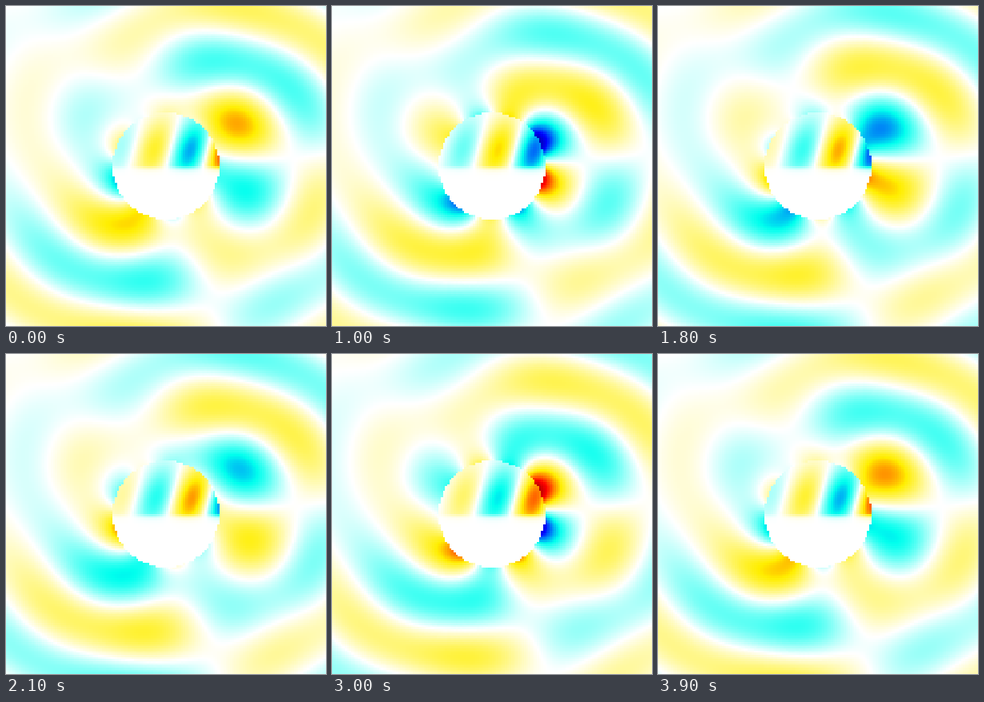
An HTML page with a canvas that plays this animation: 400x400 px, repeating every 4000 ms.

```html
<!DOCTYPE html>
<html>
<head>
<meta charset="utf-8">
<style>
html, body { margin: 0; height: 100%; overflow: hidden; background: #fff; }
canvas { display: block; width: 100vw; height: 100vh; image-rendering: pixelated; }
</style>
</head>
<body>
<canvas id="stage" width="150" height="150"></canvas>
<script>
const N = 150, CELL = 400 / N, RADIUS = 66.5;
const PERIOD = 4000, STEP = 100;
const K = 2 * Math.PI / 133.3; // wave number outside the disc, per pixel
const RAD = Math.PI / 180;

// Scattered wave: [order, amplitude, phase in degrees] of each multipole.
const MULTIPOLES = [
  [-5, .25, 274], [-4, .85, 228], [-3, .22, -71], [-2, 1.05, 192], [-1, .19, -59], [0, .42, 157],
  [1, .08, 100], [2, .34, 32], [3, .35, 95], [4, .45, 106], [5, .29, 140]
];

// Hankel function of the first kind, from its integral form.
function hankel(n, x) {
  const steps = 160, da = Math.PI / steps, dt = 4 / steps, sign = n % 2 ? -1 : 1;
  let re = 0, im = 0;
  for (let i = 0; i < steps; i++) {
    const a = (i + .5) * da, t = (i + .5) * dt;
    const phase = x * Math.sin(a) - n * a;
    re += Math.cos(phase) * da;
    im += Math.sin(phase) * da
      - (Math.exp(n * t) + sign * Math.exp(-n * t)) * Math.exp(-x * Math.sinh(t)) * dt;
  }
  return [re / Math.PI, im / Math.PI];
}

const cache = {};
function radial(r) {
  const key = Math.round(r * 2);
  return cache[key] ||= [0, 1, 2, 3, 4, 5].map(n => hankel(n, K * key / 2));
}

function outside(x, y, r) {
  const angle = Math.atan2(y, x), h = radial(r);
  let re = 0, im = 0;
  for (const [m, amplitude, phase] of MULTIPOLES) {
    const a = m * angle + phase * RAD, [hr, hi] = h[Math.abs(m)];
    re += amplitude * (hr * Math.cos(a) - hi * Math.sin(a));
    im += amplitude * (hr * Math.sin(a) + hi * Math.cos(a));
  }
  return [re, im];
}

// A wave running right and growing, which dies out just below the diameter.
function inside(x, y) {
  const top = Math.min(y, 0);
  const amplitude = Math.max(0, 1.01 + .011 * x)
    * Math.exp(-(((top + 18) / 40) ** 2)) * Math.exp(-Math.max(y, 0) / 3);
  const phase = (424 + 3.9 * x + top + 25) * RAD;
  return [amplitude * Math.cos(phase), amplitude * Math.sin(phase)];
}

const field = Array.from({ length: N * N }, (_, n) => {
  const x = (n % N + .5) * CELL - 200, y = (Math.floor(n / N) + .5) * CELL - 200;
  const r = Math.hypot(x, y);
  return r < RADIUS ? inside(x, y) : outside(x, y, r);
});

const WARM = [[255, 255, 255], [255, 238, 0], [255, 0, 0], [128, 0, 0]];
const COOL = [[255, 255, 255], [0, 255, 238], [0, 0, 255], [0, 0, 128]];

const ctx = document.getElementById('stage').getContext('2d');
const image = ctx.createImageData(N, N);
image.data.fill(255);

function draw() {
  const time = Math.floor(performance.now() % PERIOD / STEP) * STEP;
  const a = 2 * Math.PI * time / PERIOD, cos = Math.cos(a), sin = Math.sin(a);
  field.forEach(([re, im], n) => {
    const v = re * cos + im * sin, ramp = v > 0 ? WARM : COOL;
    const level = Math.min(Math.abs(v), 2.999), i = Math.floor(level), t = level - i;
    for (let c = 0; c < 3; c++)
      image.data[4 * n + c] = ramp[i][c] + (ramp[i + 1][c] - ramp[i][c]) * t;
  });
  ctx.putImageData(image, 0, 0);
  requestAnimationFrame(draw);
}
draw();
</script>
</body>
</html>
```
